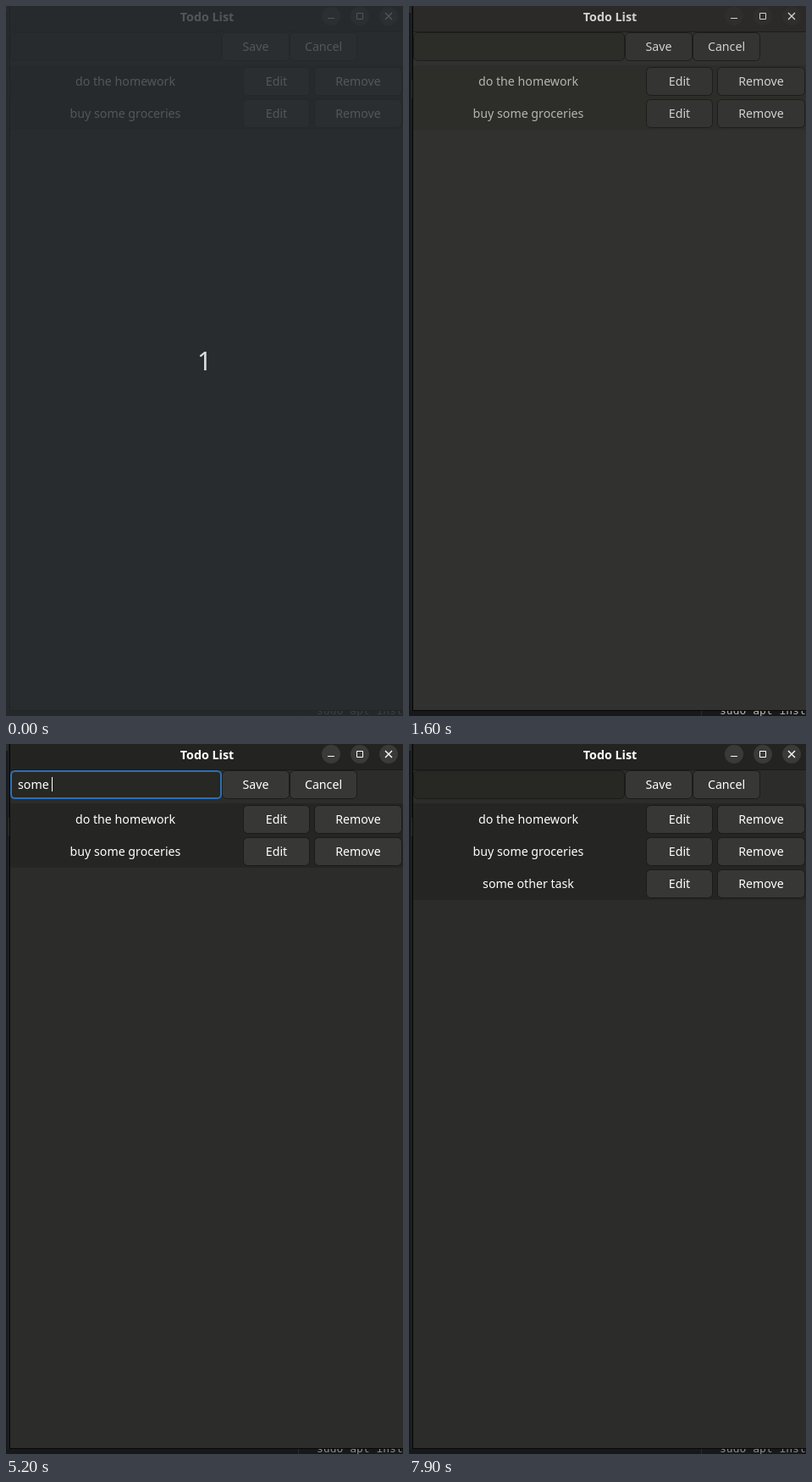
These frames come from a looping animation (469x838 px, 8000 ms). An HTML page with a canvas:

```html
<!DOCTYPE html>
<html lang="en">
<head>
<meta charset="utf-8">
<title>Todo List</title>
<style>
html, body { margin: 0; width: 100%; height: 100%; overflow: hidden; background: #171819; }
canvas { display: block; }
</style>
</head>
<body>
<canvas id="stage" width="469" height="838"></canvas>
<script>
const ctx = document.getElementById('stage').getContext('2d');
const LOOP = 8000, STEP = 100;
const SANS = '"Noto Sans", "Open Sans", sans-serif';
const BODY = '14.2px ' + SANS;
const MONO = '13px "DejaVu Sans Mono", monospace';
const TASK = 'some other task';

// Colours as [focused, unfocused]
const C = {
  head: [[35, 35, 34], [45, 44, 42]],
  back: [[44, 44, 43], [51, 51, 50]],
  entry: [[39, 39, 35], [46, 47, 42]],
  row: [[37, 37, 36], [47, 48, 43]],
  button: [[55, 55, 54], [51, 51, 50]],
  line: [[27, 27, 26], [29, 29, 28]],
  text: [[255, 255, 255], [194, 193, 190]],
  label: [[255, 255, 255], [155, 155, 152]],
  shell: [[143, 141, 136], [201, 196, 184]]
};

let t = 0, dim = 0;

const ramp = (a, b) => Math.min(1, Math.max(0, (t - a) / (b - a)));
const pulse = (a, b, c, d) => ramp(a, b) - ramp(c, d);
const mix = (p, q, k) => p.map((v, i) => v + (q[i] - v) * k);
const rgb = c => `rgb(${c.map(Math.round).join(',')})`;
const col = name => rgb(mix(...C[name], dim));

function fill(x, y, w, h, color) {
  ctx.fillStyle = color;
  ctx.fillRect(x, y, w, h);
}

function text(str, x, y, color, font = BODY, align = 'center') {
  ctx.font = font;
  ctx.textAlign = align;
  ctx.fillStyle = color;
  ctx.fillText(str, x, y);
}

function box(x, y, w, h, color, ring = 0) {
  ctx.beginPath();
  ctx.roundRect(x + .5, y + .5, w - 1, h - 1, 5);
  ctx.fillStyle = color;
  ctx.fill();
  ctx.lineWidth = 1;
  ctx.strokeStyle = col('line');
  ctx.stroke();
  if (ring > 0) {
    ctx.beginPath();
    ctx.roundRect(x + 1, y + 1, w - 2, h - 2, 4.5);
    ctx.lineWidth = 2;
    ctx.strokeStyle = `rgba(44,112,184,${ring})`;
    ctx.stroke();
  }
}

function button(label, x, y, w, ring) {
  box(x, y, w, 34, col('button'), ring);
  text(label, x + w / 2, y + 22, col('text'));
}

function row(label, i, hover) {
  const y = 70 + i * 38;
  fill(5, y, 464, 38, rgb(mix(mix(...C.row, dim), [50, 50, 49], hover)));
  text(label, 141, y + 24, col('label'));
  button('Edit', 280, y + 2, 79);
  button('Remove', 364, y + 2, 104);
}

function titleBar() {
  fill(5, 0, 464, 30, col('head'));
  fill(5, 30, 464, 1, col('line'));
  text('Todo List', 237.5, 18, col('text'), 'bold 14.3px ' + SANS);
  for (const x of [384, 418, 452]) {
    ctx.beginPath();
    ctx.arc(x, 12, 11, 0, 7);
    ctx.fillStyle = `rgba(58,58,57,${1 - dim})`;
    ctx.fill();
  }
  ctx.strokeStyle = col('text');
  ctx.lineWidth = 1;
  ctx.beginPath();
  ctx.moveTo(380, 14.5); ctx.lineTo(388, 14.5);
  ctx.rect(414.5, 8.5, 7, 7);
  ctx.stroke();
  ctx.lineWidth = 1.4;
  ctx.beginPath();
  ctx.moveTo(448, 8); ctx.lineTo(456, 16);
  ctx.moveTo(456, 8); ctx.lineTo(448, 16);
  ctx.stroke();
}

function typedCount() {
  if (t >= 7000 || t < 4800) return 0;
  if (t < 5400) return Math.min(5, (t - 4700) / STEP);
  if (t < 6300) return Math.min(13, 5 + (t - 5300) / STEP);
  return t < 6400 ? 14 : 15;
}

function entry() {
  box(5, 31, 250, 34, col('entry'), pulse(3500, 3700, 6600, 6800));
  const typed = TASK.slice(0, typedCount());
  text(typed, 14, 53, col('text'), BODY, 'left');
  if (t >= 3500 && t < 6700 && !(t >= 4400 && t < 4700))
    fill(14 + Math.round(ctx.measureText(typed).width), 39, 1, 17, '#fff');
}

function desktop() {
  fill(0, 0, 469, 838, '#171819');
  fill(0, 0, 3, 8, '#292a2a');
  fill(2, 8, 1, 824, '#222323');
  fill(3, 87, 1, 22, '#2a2b2b');
  fill(345, 832, 1, 6, '#292a2b');
  text('sudo apt install', 367, 836, col('shell'), MONO, 'left');
  fill(4, 0, 465, 832, '#080808');
}

function countdown() {
  const k = 1 - ramp(0, 400);
  if (!k) return;
  fill(0, 0, 469, 838, `rgba(39,44,48,${.8 * k})`);
  text('1', 234.5, 430, `rgba(222,222,222,${k})`, '30px ' + SANS);
}

function draw() {
  dim = pulse(300, 600, 1500, 1900);
  desktop();
  fill(5, 0, 464, 831, col('back'));
  titleBar();
  entry();
  button('Save', 255, 31, 80, pulse(6600, 6900, 6900, 7100));
  button('Cancel', 335, 31, 80);
  row('do the homework', 0,
    pulse(2600, 2800, 2900, 3100) + .5 * pulse(7600, 7700, 7700, 7800));
  row('buy some groceries', 1,
    pulse(1900, 2200, 2300, 2500) + pulse(2600, 2700, 2700, 2900) +
    .5 * pulse(7600, 7800, 7800, 7900));
  if (t >= 7000) row(TASK, 2, .5 * pulse(7700, 7800, 7800, 7900));
  countdown();
}

const start = performance.now();
function tick(now) {
  t = Math.floor(Math.max(0, now - start) % LOOP / STEP) * STEP;
  draw();
  requestAnimationFrame(tick);
}
tick(start);
</script>
</body>
</html>
```
